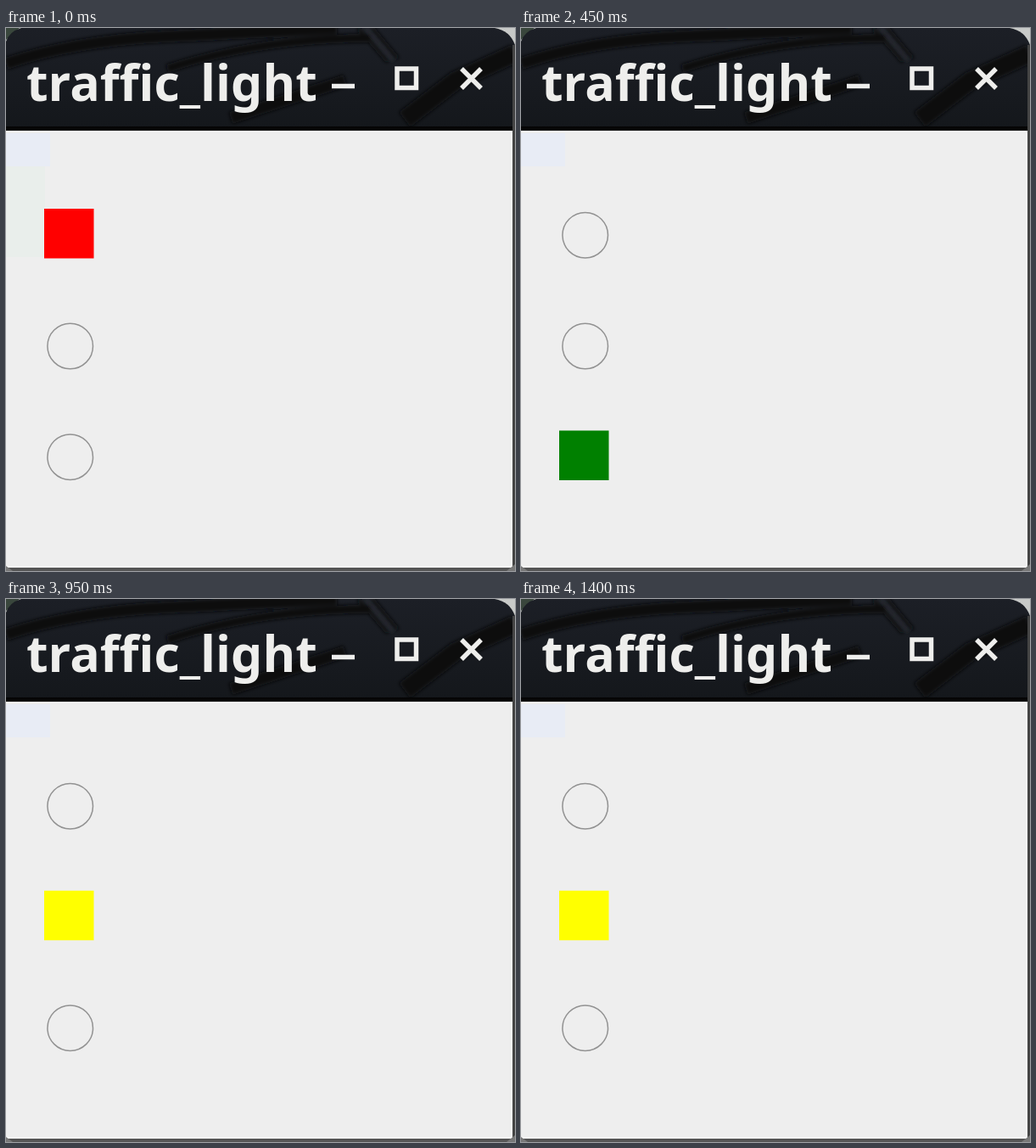
These frames come from a looping animation (600x640 px, 1450 ms). An HTML page:

```html
<!DOCTYPE html>
<html lang="en">
<head>
<meta charset="utf-8">
<title>traffic_light</title>
<style>
  html, body { margin: 0; width: 100%; height: 100%; overflow: hidden; }
  svg { display: block; width: 600px; height: 640px; }
  text { font: 600 59px "Noto Sans", sans-serif; fill: #eeeeec; }
</style>
</head>
<body>
<svg viewBox="0 0 600 640">
  <defs>
    <linearGradient id="bar" x2="0" y2="1">
      <stop offset="0" stop-color="#1c1f26"/>
      <stop offset="1" stop-color="#14171b"/>
    </linearGradient>
    <clipPath id="frame"><path d="M0 640V16Q4 4 18 0H576Q594 3 600 20V640Z"/></clipPath>
    <filter id="soft"><feGaussianBlur stdDeviation="2"/></filter>
    <filter id="edge"><feGaussianBlur stdDeviation=".7"/></filter>
  </defs>
  <rect width="600" height="640" fill="#c8cac8"/>
  <path d="M0 0H16L0 14Z" fill="#39463c"/>
  <g clip-path="url(#frame)">
    <rect width="600" height="122" fill="url(#bar)"/>
    <g filter="url(#soft)" fill="none" stroke="#0b0d11">
      <path d="M0 42Q80 15 190 10T390 0" stroke-width="14"/>
      <path d="M190 48Q300 12 430 12" stroke-width="10"/>
      <path d="M265 106L400 62" stroke-width="14"/>
      <path d="M470 108L530 62L600 30" stroke-width="22"/>
      <path d="M415 0L450 40M432 0L462 36" stroke-width="4"/>
      <path d="M424 0L456 38" stroke="#2b2e34" stroke-width="3"/>
    </g>
    <rect y="116" width="600" height="5" fill="#050505"/>
    <rect y="121" width="600" height="519" fill="#eee"/>
    <rect y="121" width="597" height="2" fill="#fafafa"/>
    <rect y="124" width="52" height="39" fill="#e8ecf5"/>
    <rect id="tint" y="163" width="46" height="107" fill="#e9eeeb"/>
    <path d="M596 122V635H0" fill="none" stroke="#fafafa" stroke-width="2"/>
    <rect x="597" y="20" width="3" height="620" fill="#444"/>
    <rect y="636" width="600" height="4" fill="#555"/>
    <path d="M0 634V640H8ZM600 632V640H590Z" fill="#777"/>
  </g>
  <g filter="url(#edge)">
    <text x="24" y="86">traffic_light</text>
    <g fill="none" stroke="#eeeeec" stroke-width="5.5">
      <path d="M384 68.5H411"/>
      <rect x="461" y="48" width="22.5" height="22.5"/>
      <path d="M537 48L560 71M560 48L537 71"/>
    </g>
  </g>
  <g id="lamps"></g>
</svg>
<script>
  const LOOP = 1450;
  const colors = ["#f00", "#ff0", "#008000"];
  const lamps = document.getElementById("lamps");
  const tint = document.getElementById("tint");

  lamps.innerHTML = colors.map((color, i) => `
    <g transform="translate(0 ${i * 130.75})">
      <circle cx="75.7" cy="244.2" r="26.8" fill="none" stroke="#929292" stroke-width="1.5"/>
      <rect x="45" y="213" width="58.5" height="58.5" fill="${color}"/>
    </g>`).join("");

  const litAt = t => t < 450 ? 0 : t < 950 ? 2 : 1;

  function draw(now) {
    const lit = litAt(now % LOOP);
    [...lamps.children].forEach((lamp, i) => {
      const [ring, square] = lamp.children;
      ring.style.display = i === lit ? "none" : "";
      square.style.display = i === lit ? "" : "none";
    });
    tint.style.display = lit === 0 ? "" : "none";
  }

  const start = performance.now();
  function tick() {
    draw(performance.now() - start);
    requestAnimationFrame(tick);
  }
  tick();
</script>
</body>
</html>
```
